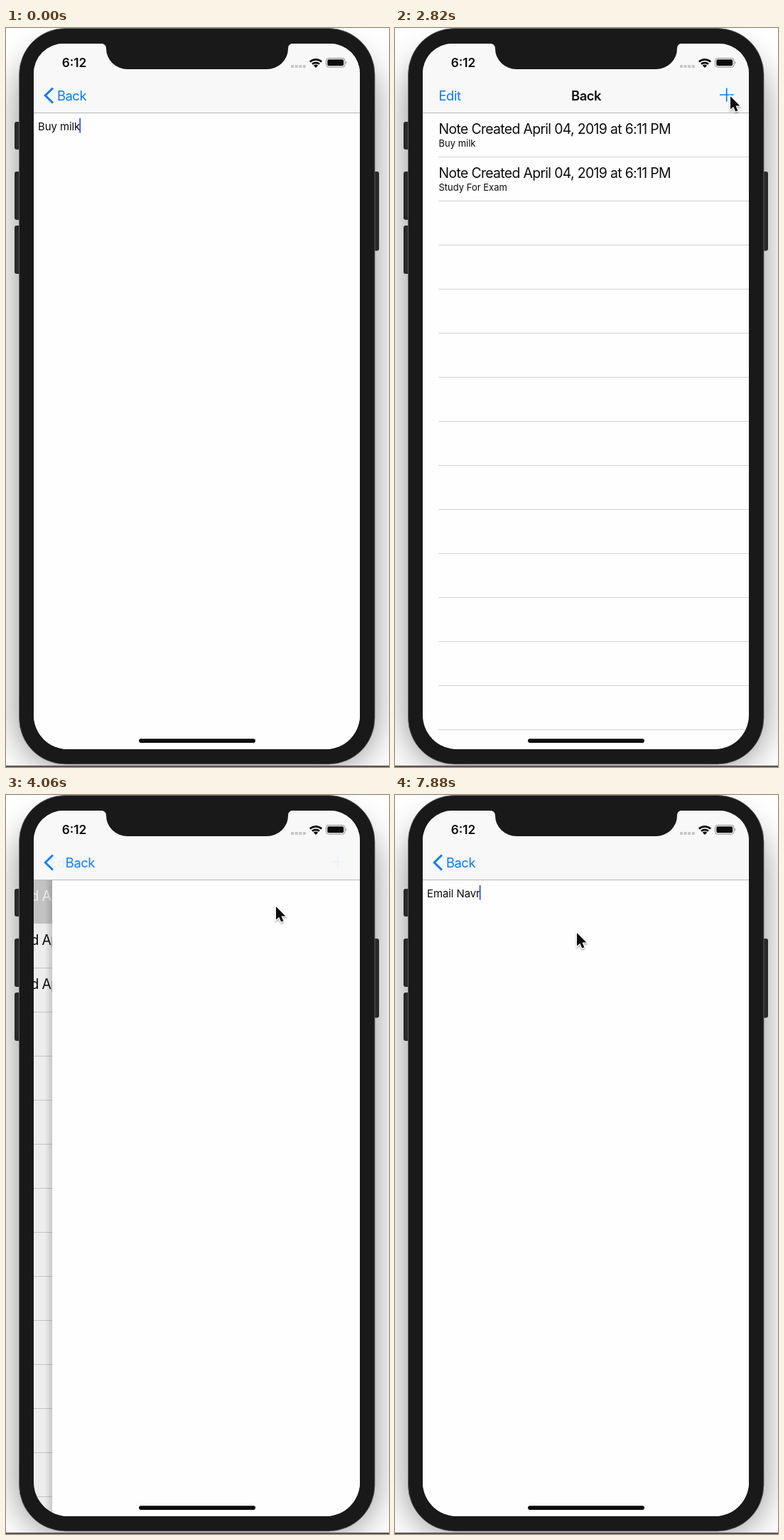
Recreate the animation shown at these times as an HTML page. Size 539 px wide and 1040 px high, loop 8000 ms.

```html
<!DOCTYPE html>
<html lang="en">
<head>
<meta charset="utf-8">
<title>Notes</title>
<style>
  html, body { margin: 0; width: 100%; height: 100%; overflow: hidden; background: #fff; }
  svg { display: block; width: 100vw; height: 100vh; }
  text { font-family: Inter, "Noto Sans", sans-serif; font-optical-sizing: none; white-space: pre; fill: #0c0c0c; }
  .bar { font-size: 18.4px; letter-spacing: -.45px; }
  .bold { font-weight: 600; }
  .blue { fill: #0a7af5; }
  .line { fill: none; stroke: #0a7af5; }
  .name { font-size: 19.4px; letter-spacing: -.65px; }
  .detail { font-size: 13px; }
  .note { font-size: 15px; letter-spacing: -.1px; }
</style>
</head>
<body>
<svg viewBox="0 0 539 1040">
  <defs>
    <filter id="blur" x="-30%" y="-30%" width="160%" height="160%"><feGaussianBlur stdDeviation="25"/></filter>
    <filter id="soft" x="-50%" y="-50%" width="200%" height="200%">
      <feDropShadow dx="0" dy="1.5" stdDeviation="1.2" flood-opacity=".4"/>
    </filter>
    <linearGradient id="edge"><stop stop-opacity="0"/><stop offset="1" stop-opacity=".16"/></linearGradient>
    <clipPath id="screen"><path d="M39 64A42 42 0 0 1 81 22H456A42 42 0 0 1 498 64V967A48 48 0 0 1 450 1015H87A48 48 0 0 1 39 967Z"/></clipPath>
    <clipPath id="content"><rect x="39" y="120" width="459" height="895"/></clipPath>
  </defs>

  <rect x="18" y="38" width="501" height="1000" rx="64" opacity=".45" filter="url(#blur)"/>
  <rect y="1038" width="539" height="2" fill="#555"/>
  <g fill="#292929">
    <rect x="12" y="132" width="14" height="39" rx="3"/>
    <rect x="12" y="202" width="14" height="68" rx="3"/>
    <rect x="12" y="278" width="14" height="68" rx="3"/>
    <rect id="sideButton" x="510" y="202" width="15" height="111.5" rx="3"/>
  </g>
  <rect x="18.5" y=".5" width="500.5" height="1035.5" rx="65" fill="#191919" stroke="#6a6a6a" stroke-width=".8"/>

  <g clip-path="url(#screen)">
    <rect x="39" y="22" width="459" height="993" fill="#fefefe"/>
    <g clip-path="url(#content)">
      <g id="list">
        <g id="oldRows"></g>
        <g id="newRow"></g>
      </g>
      <rect id="dim" x="39" y="120" width="459" height="895"/>
      <g id="editor">
        <rect x="29" y="120" width="10" height="895" fill="url(#edge)"/>
        <rect x="39" y="120" width="460" height="895" fill="#fefefe"/>
        <text id="note" class="note" x="45" y="143.5"></text>
        <rect id="caret" y="127" width="2" height="20.5" fill="#3f65df"/>
      </g>
    </g>

    <rect x="39" y="22" width="459" height="97" fill="#f8f8f8"/>
    <rect x="39" y="119" width="459" height="1" fill="#b9b9b9"/>
    <g id="listItems">
      <text class="bar blue" x="61.5" y="101.5">Edit</text>
      <path class="line" d="M457 94H476.5M466.7 84.5V103.5" stroke-width="1.7"/>
    </g>
    <path id="chevron" class="line" d="M66 84.5L55.3 95L66 105.5" stroke-width="3"/>
    <text id="title" class="bar bold" y="101.5" text-anchor="middle">Back</text>
    <text id="backLabel" class="bar blue" y="101.5" text-anchor="middle">Back</text>

    <text class="bold" x="96" y="55.3" font-size="17.3" text-anchor="middle">6:12</text>
    <path d="M401 54H422" stroke="#c6c6c6" stroke-width="4" stroke-dasharray="4 1.6"/>
    <g fill="none" stroke="#0c0c0c" stroke-width="2.7">
      <path d="M427.8 47.6A12 12 0 0 1 444.2 47.6M431 50.8A7.5 7.5 0 0 1 441 50.8"/>
    </g>
    <path d="M436 56L432.8 52.8A4.6 4.6 0 0 1 439.2 52.8Z" fill="#0c0c0c"/>
    <rect x="450.5" y="42.5" width="26.5" height="12.6" rx="3.4" fill="none" stroke="#8d8d8d"/>
    <rect x="452.3" y="44.3" width="22.9" height="9" rx="1.8" fill="#0c0c0c"/>
    <path d="M478.2 46.8Q480.6 48.8 478.2 50.8Z" fill="#8d8d8d"/>
    <rect x="187" y="1000.3" width="164" height="5.6" rx="2.8" fill="#0c0c0c"/>
  </g>
  <path d="M133 21.5Q141 22 141 29A30 29 0 0 0 171 58H367A30 29 0 0 0 397 29Q397 22 404 21.5Z" fill="#191919"/>

  <path id="pointer" d="M0 0V18.6L4.2 14.7L7.2 21.6L10.4 20.2L7.5 13.5H13.4Z" fill="#0c0c0c"
        stroke="#fff" stroke-width="2.2" paint-order="stroke" filter="url(#soft)"/>
</svg>

<script>
const LOOP = 8000, ROW = 62, WIDTH = 459;
const POP = 1640, INSERT = 2860, SELECT = 3660, PUSH = 3774, EDIT = 4720;
const TYPED = "Email Navr";
const KEY_TIMES = [5620, 5860, 6020, 6280, 6540, 6720, 7060, 7360, 7580, 7840];
// time, x, y of the mouse pointer
const POINTER = [
  [400, 545, 215], [1200, 104, 94], [1300, 102, 92], [2140, 102, 92], [2640, 472, 96],
  [2940, 472, 96], [3300, 386, 161], [3460, 380, 157], [4060, 380, 157], [4540, 256, 194]
];

const el = id => document.getElementById(id);
const set = (id, attrs) => {
  for (const key in attrs) el(id).setAttribute(key, attrs[key]);
};
const shift = (x, y) => `translate(${x} ${y})`;
const ramp = (t, from, to) => Math.min(1, Math.max(0, (t - from) / (to - from)));
const smooth = u => u * u * (3 - 2 * u);

// Critically damped slide used by screen transitions
function spring(ms) {
  if (ms <= 0) return 0;
  if (ms > 500) return 1;
  const a = ms * .016;
  return 1 - (1 + a) * Math.exp(-a);
}

const row = (y, minute, detail) => `<g transform="${shift(0, y)}">
  <rect class="highlight" x="39" width="${WIDTH}" height="61" fill="#d0d0d0" opacity="0"/>
  <text class="name" x="61.5" y="28.5">Note Created April 04, 2019 at 6:${minute} PM</text>
  <text class="detail" x="61.5" y="47">${detail}</text></g>`;

let rows = row(120 , 11, "Buy milk") + row(120 + ROW, 11, "Study For Exam");
for (let i = 0; i < 15; i++)
  rows += `<rect x="61.5" y="${119 + i * ROW}" width="437" height="1" fill="#d2d2d4" transform="translate(0 62)"/>`;
el("oldRows").innerHTML = rows;
el("newRow").innerHTML = row(120, 12, "Empty");

function highlight(group, amount) {
  const target = el(group).querySelector("g");
  target.querySelector(".highlight").setAttribute("opacity", amount);
  target.querySelector(".name").style.fill = amount > .5 ? "#fff" : "";
}

function caretAlpha(t) {
  if (t < POP + 500) return 1 - ramp(t, 40, 260) + ramp(t, 480, 680);
  if (t < EDIT) return 0;
  return t < KEY_TIMES[0] ? 1 - ramp(t, 5360, 5600) : 1;
}

function drawPointer(t) {
  const next = POINTER.findIndex(p => p[0] > t);
  let [, x, y] = POINTER[POINTER.length - 1];
  if (next > 0) {
    const [t0, x0, y0] = POINTER[next - 1], [t1, x1, y1] = POINTER[next];
    const u = smooth(ramp(t, t0, t1));
    x = x0 + (x1 - x0) * u;
    y = y0 + (y1 - y0) * u;
  }
  set("pointer", { transform: shift(x, y), visibility: next === 0 ? "hidden" : "visible" });
}

function draw(t) {
  const depth = t < PUSH ? 1 - spring(t - POP) : spring(t - PUSH);
  const inserted = smooth(ramp(t, INSERT, INSERT + 300));

  set("list", { transform: shift(-.3 * WIDTH * depth, 0) });
  set("oldRows", { transform: shift(0, ROW * inserted) });
  set("newRow", { opacity: inserted });
  highlight("oldRows", t < INSERT ? depth : 0);
  highlight("newRow", t >= SELECT ? 1 : 0);
  set("dim", { opacity: .07 * depth });

  const count = KEY_TIMES.filter(k => k <= t).length;
  el("note").textContent = t < INSERT ? "Buy milk" : TYPED.slice(0, count);
  const length = el("note").textContent ? el("note").getComputedTextLength() : 0;
  set("caret", { x: 44 + length, opacity: caretAlpha(t) });
  set("editor", { transform: shift(WIDTH * (1 - depth), 0), visibility: depth > 0 ? "visible" : "hidden" });

  const titleX = 269 - 176.5 * depth ** 1.2;
  set("title", { x: titleX, opacity: 1 - depth ** 2 });
  set("backLabel", { x: titleX, opacity: depth ** 2 });
  set("chevron", { opacity: depth });
  set("listItems", { opacity: 1 - depth });

  const raised = ramp(t, 1160, 1300) - ramp(t, 1620, 1740);
  set("sideButton", { width: 15 + 2 * raised });
  drawPointer(t);
}

function frame(now) {
  draw(now % LOOP);
  requestAnimationFrame(frame);
}
draw(0);
requestAnimationFrame(frame);
</script>
</body>
</html>
```
